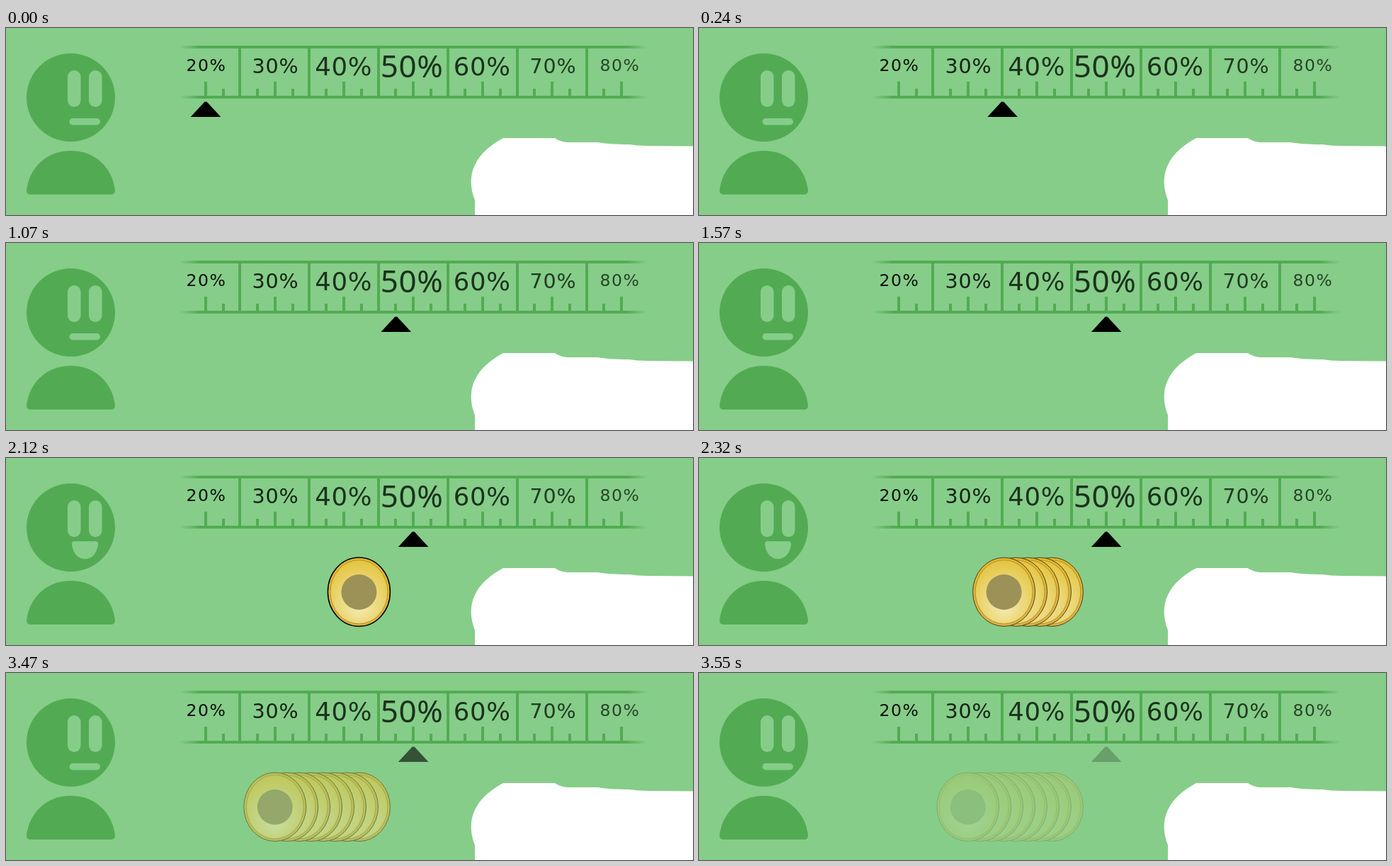
These frames come from a looping animation (970 px wide and 265 px high, 3.59 s). An HTML page with a canvas:

```html
<!DOCTYPE html>
<html lang="en">
<head>
<meta charset="utf-8">
<title>Guess meter</title>
<style>
html, body { margin: 0; width: 100%; height: 100%; overflow: hidden; background: #86cd89; }
canvas { display: block; }
</style>
</head>
<body>
<canvas id="stage" width="970" height="265"></canvas>
<script>
const W = 970, H = 265, LOOP = 3590;
const BG = '#86cd89', GREEN = '#52ab53';
const ctx = document.getElementById('stage').getContext('2d');

function makeLayer() {
  const c = document.createElement('canvas');
  c.width = W;
  c.height = H;
  return c.getContext('2d');
}
const scene = makeLayer(), props = makeLayer();

function pill(c, x, y, w, h, r, color) {
  c.fillStyle = color;
  c.beginPath();
  c.roundRect(x, y, w, h, r);
  c.fill();
}

function label(c, text, x, y, size, font, color, gap) {
  c.font = `${size}px ${font}`;
  c.letterSpacing = gap + 'px';
  c.textAlign = 'left';
  c.fillStyle = color;
  const m = c.measureText(text);
  const ink = (m.actualBoundingBoxRight - m.actualBoundingBoxLeft) / 2;
  c.fillText(text, x - ink, y);
}

function drawRuler(c) {
  const fade = c.createLinearGradient(244, 0, 906, 0);
  fade.addColorStop(0, 'rgba(82,171,83,0)');
  fade.addColorStop(0.045, GREEN);
  fade.addColorStop(0.955, GREEN);
  fade.addColorStop(1, 'rgba(82,171,83,0)');
  c.fillStyle = fade;
  c.fillRect(244, 25, 662, 4);
  c.fillRect(244, 96, 662, 4);

  c.fillStyle = GREEN;
  for (let i = 0; i < 7; i++) {
    const x = Math.round(281.7 + i * 97.8);
    c.fillRect(x - 2, 76, 4, 21);
    if (i > 0) c.fillRect(x - 27, 86, 4, 11);
    if (i < 6) {
      c.fillRect(x + 23, 86, 4, 11);
      c.fillRect(328 + i * 98, 27, 4, 71);
    }
  }

  const wide = '"DejaVu Sans", sans-serif';
  const tall = '"Noto Sans", sans-serif';
  label(c, '20%', 282.5, 61, 23.5, wide, '#081008', 1.5);
  label(c, '30%', 380.5, 64, 28.5, wide, '#122314', 0.8);
  label(c, '40%', 476, 66.5, 35.5, wide, '#1b321d', 0.6);
  label(c, '50%', 573, 69.5, 44, tall, '#1b321d', 0.5);
  label(c, '60%', 672, 66.5, 35.5, wide, '#1b321d', 0.6);
  label(c, '70%', 772.5, 64, 28.5, wide, '#203a22', 0.8);
  label(c, '80%', 866.5, 61, 23.5, wide, '#274529', 1.5);
}

function drawFigure(c) {
  c.fillStyle = GREEN;
  c.beginPath();
  c.arc(91.5, 98.5, 62.5, 0, Math.PI * 2);
  c.fill();

  c.beginPath();
  c.moveTo(29, 230);
  c.bezierCurveTo(33, 197, 58, 174, 91.5, 174);
  c.bezierCurveTo(125, 174, 150, 197, 154, 230);
  c.quadraticCurveTo(154, 236, 148, 236);
  c.lineTo(35, 236);
  c.quadraticCurveTo(29, 236, 29, 230);
  c.fill();

  pill(c, 87, 60, 18.5, 52, 9.2, BG);
  pill(c, 117, 60, 18.5, 52, 9.2, BG);
}

function drawBlob(c) {
  c.fillStyle = '#fff';
  c.beginPath();
  c.moveTo(662, 265);
  c.lineTo(662, 244);
  c.bezierCurveTo(656, 229, 654, 210, 662, 194);
  c.bezierCurveTo(670, 177, 684, 166, 702, 156);
  c.lineTo(775, 156);
  c.quadraticCurveTo(782, 161, 792, 162);
  c.lineTo(836, 162);
  c.quadraticCurveTo(850, 165, 880, 165);
  c.quadraticCurveTo(892, 167, 906, 167);
  c.lineTo(970, 167.5);
  c.lineTo(970, 265);
  c.fill();
}

function drawMouth(smile) {
  if (!smile) {
    pill(ctx, 89.5, 128, 43.5, 9.5, 4.7, BG);
    return;
  }
  ctx.fillStyle = BG;
  ctx.beginPath();
  ctx.moveTo(97, 118);
  ctx.lineTo(126, 118);
  ctx.quadraticCurveTo(130.5, 118, 130, 123);
  ctx.bezierCurveTo(128, 136, 121, 143, 111.5, 143);
  ctx.bezierCurveTo(102, 143, 95, 136, 93, 123);
  ctx.quadraticCurveTo(92.5, 118, 97, 118);
  ctx.fill();
}

function drawPointer(c, x) {
  c.fillStyle = '#000';
  c.beginPath();
  c.moveTo(x - 21.3, 126);
  c.lineTo(x - 1.5, 104.5);
  c.lineTo(x + 1.5, 104.5);
  c.lineTo(x + 21.3, 126);
  c.fill();
}

function oval(c, x, y, rx, ry) {
  c.beginPath();
  c.ellipse(x, y, rx, ry, 0, 0, Math.PI * 2);
}

function drawCoin(c, x, bold) {
  const y = 189.8;
  const rim = c.createLinearGradient(0, 141, 0, 239);
  rim.addColorStop(0, '#e2b92f');
  rim.addColorStop(1, '#d9b548');
  oval(c, x, y, 44, 48.7);
  c.fillStyle = rim;
  c.fill();
  c.lineWidth = bold ? 1.5 : 1;
  c.strokeStyle = bold ? '#000' : '#4d3d12';
  c.stroke();

  const face = c.createRadialGradient(x, y + 24, 6, x, y + 8, 54);
  face.addColorStop(0, '#f2e6a4');
  face.addColorStop(0.5, '#ebd778');
  face.addColorStop(1, '#e3c43c');
  oval(c, x, y, 40.5, 45.2);
  c.fillStyle = face;
  c.fill();
  c.lineWidth = 1;
  c.strokeStyle = '#b88d24';
  c.stroke();
}

function drawCoins(c, count) {
  let x = 0;
  for (let i = 0; i < count; i++) {
    x = 498.4 - i * 16.95;
    drawCoin(c, x, count === 1);
  }
  if (!count) return;
  c.fillStyle = '#9c9157';
  oval(c, x, 190, 25, 25);
  c.fill();
}

// Ruler position of the pointer, in quarter divisions from 20%.
function pointerStep(t) {
  if (t < 640) return Math.min(14, Math.floor(t / 40));
  if (t < 720) return 15;
  if (t < 820) return 14;
  if (t < 920) return 13;
  if (t < 1070) return 12;
  if (t < 1220) return 11;
  if (t < 1370) return 10;
  if (t < 1570) return 11;
  return 12;
}

function render(t) {
  const count = t < 2120 ? 0 : Math.min(8, 1 + Math.floor((t - 2120) / 50));
  const fade = t < 3470 ? 1 : 0.6 - 0.19 * Math.floor((t - 3470) / 40);

  ctx.drawImage(scene.canvas, 0, 0);
  drawMouth(t >= 2120 && t < 3470);

  props.clearRect(0, 0, W, H);
  drawPointer(props, 282 + pointerStep(t) * 24.43);
  drawCoins(props, count);
  ctx.globalAlpha = fade;
  ctx.drawImage(props.canvas, 0, 0);
  ctx.globalAlpha = 1;
}

scene.fillStyle = BG;
scene.fillRect(0, 0, W, H);
drawRuler(scene);
drawFigure(scene);
drawBlob(scene);

const start = performance.now();
function tick() {
  render((performance.now() - start) % LOOP);
  requestAnimationFrame(tick);
}
tick();
</script>
</body>
</html>
```
